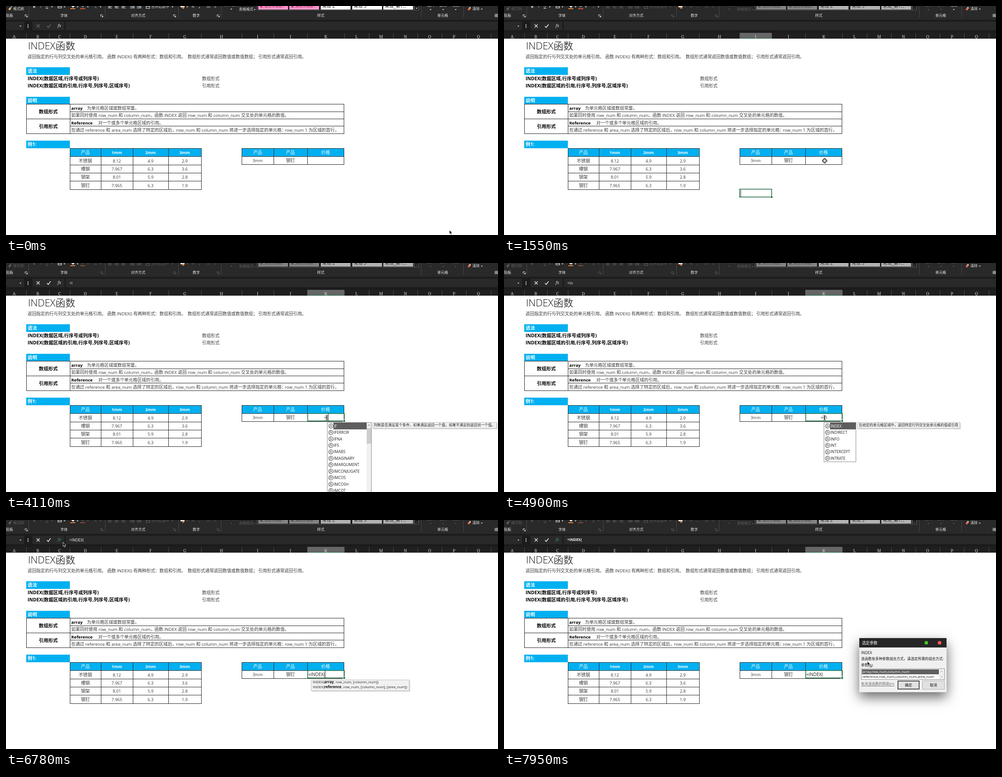
These frames come from a looping animation (1094x512 px, 8 s). An HTML page with a canvas:

```html
<!DOCTYPE html>
<html lang="zh-CN">
<head>
<meta charset="utf-8">
<title>INDEX函数</title>
<style>
html, body { margin: 0; width: 100%; height: 100%; overflow: hidden; background: #fff; }
canvas { display: block; }
</style>
</head>
<body>
<canvas id="stage" width="1094" height="512"></canvas>
<script>
const g = document.getElementById('stage').getContext('2d');
const LOOP = 8000;
const SANS = '"Open Sans", "Noto Sans CJK SC", "Noto Sans CJK", sans-serif';
const BLUE = '#00b0f0', GREEN = '#217346', DIM = '#5c5c5c', LIT = '#e6e6e6', RULE = '#222';

function box(x, y, w, h, color) {
  g.fillStyle = color;
  g.fillRect(x, y, w, h);
}

function frame(x, y, w, h, color) {
  g.strokeStyle = color;
  g.lineWidth = 1;
  g.strokeRect(x + .5, y + .5, w - 1, h - 1);
}

// y is the vertical middle of the line; returns the right end
function text(s, x, y, size = 9.7, color = '#3a3a3a', weight = 400, align = 'left', font = SANS) {
  g.font = `${weight} ${size}px ${font}`;
  g.textAlign = align;
  g.fillStyle = color;
  g.fillText(s, x, y + size * .37);
  return x + g.measureText(s).width;
}
const mid = (s, x, y, size, color, weight) => text(s, x, y, size, color, weight, 'center');

function path(points, color, width = 1, fill) {
  g.beginPath();
  points.forEach(([x, y], i) => i ? g.lineTo(x, y) : g.moveTo(x, y));
  if (fill) { g.closePath(); g.fillStyle = fill; g.fill(); }
  if (color) { g.strokeStyle = color; g.lineWidth = width; g.stroke(); }
}

function disc(x, y, r, fill, stroke) {
  g.beginPath();
  g.arc(x, y, r, 0, 7);
  if (fill) { g.fillStyle = fill; g.fill(); }
  if (stroke) { g.strokeStyle = stroke; g.lineWidth = 1; g.stroke(); }
}

const drop = (x, y, color) => path([[x - 2, y - 1], [x + 2, y - 1], [x, y + 1.4]], null, 0, color);

function chevron(x, y, dir, color) {
  path([[x - 2.5, y + dir], [x, y - dir * 1.5], [x + 2.5, y + dir]], color);
}

function launcher(x, y, color) {
  path([[x - 2.5, y + 1.5], [x - 2.5, y - 2.5], [x + 1.5, y - 2.5]], color);
  path([[x - .5, y - .5], [x + 2.5, y + 2.5], [x + 2.5, y - .5]], color);
  path([[x - .5, y + 2.5], [x + 2.5, y + 2.5]], color);
}

function grid(xs, ys) {
  const [l, r, t, b] = [xs[0], xs.at(-1), ys[0], ys.at(-1)];
  xs.forEach(x => box(x, t, 1, b - t + 1, RULE));
  ys.forEach(y => box(l, y, r - l + 1, 1, RULE));
}

// mode: 0 ready, 1 editing an empty cell, 2 typing a formula
function drawRibbon(mode) {
  box(0, 0, 1094, 31, '#292929');
  const a = mode ? DIM : LIT, b = mode > 1 ? DIM : LIT;

  path([[5, 7], [9, 3], [12, 6], [8, 10]], null, 0, mode ? DIM : '#d8b070');
  path([[10, 4], [13, 1]], a, 1.5);
  text('格式刷', 16, 6, 8, a);

  text('B', 60, 1.5, 8, b, 700);
  text('I', 76, 1.5, 8, b, 'italic 400');
  text('U', 88, 1, 8, b);
  box(88, 5, 6, 1, b);
  frame(115, -3, 9, 8, LIT);
  box(115, 1, 9, 1, LIT);
  path([[145, 0], [149, -3], [153, 0], [149, 4]], null, 0, LIT);
  box(143, 5, 11, 2, '#e8833a');
  text('A', 168, 0, 8, b);
  box(165, 5, 11, 2, mode > 1 ? '#8c4a35' : '#e8552f');
  [102, 182].forEach(x => drop(x, 2, b));
  [130, 159].forEach(x => drop(x, 2, LIT));
  text('文', 195, 1, 8, mode ? DIM : '#4c8fd0');
  drop(210, 2, b);

  [231, 246, 261].forEach(x => {
    for (let i = 0; i < 3; i++) box(x - 4, i * 2, i % 2 ? 6 : 9, 1, a);
  });
  [281, 296].forEach(x => {
    box(x - 5, 0, 10, 1, a);
    box(x - 1, 2, 6, 1, a);
    box(x - 5, 4, 10, 1, a);
    box(x - 5, 2, 3, 1, mode ? DIM : '#4c8fd0');
  });
  frame(311, -3, 9, 9, a);
  box(311, 1, 9, 1, a);
  text('合并后居中', 323, 1, 8, a);
  drop(370, 2, a);

  box(388, -1, 9, 4, LIT);
  disc(394, 4, 2.3, '#e8833a');
  drop(403, 2, a);
  text('%', 412, 1.5, 8, a);
  text(',', 429, 0, 10, a, 700);
  text('.00', 445, 2, 6.5, a);
  text('.0', 462, 2, 6.5, a);

  text('条件格式', 484, -3, 8, a);
  drop(501, 7, a);
  text('表格格式', 518, 7, 8, a);
  drop(553, 8, a);

  box(558, 0, 360, 11, '#1d1d1d');
  frame(558, -2, 349, 12, '#686868');
  const tiles = ['差_综合示例表…', '差_综合示例表…', '常规 2', '常规 3', '常规_第1…'];
  tiles.forEach((s, i) => {
    const x = 561 + i * 69.7 | 0, pink = i < 2;
    box(x, 0, 66, 8, mode ? (pink ? '#858585' : '#b2b2b2') : pink ? '#ff99cc' : '#fff');
    g.save();
    g.beginPath();
    g.rect(x, 0, 66, 7);
    g.clip();
    text(s, x + 3, 0, pink ? 7.8 : 10, mode ? '#333' : pink ? '#900050' : '#222');
    g.restore();
  });
  frame(908, -2, 10, 12, '#686868');
  drop(913, 5, a);

  ['插入', '删除', '格式'].forEach((s, i) => {
    const c = i === 2 ? b : a;
    text(s, 936 + i * 28, -2, 8, c);
    drop(944 + i * 28, 8, c);
  });
  path([[1026, 8], [1030, 3], [1034, 5], [1030, 10]], null, 0, '#e86b4a');
  path([[1029, 4], [1032, 2], [1034, 5]], null, 0, '#eee');
  text('清除', 1037, 6, 8, LIT);
  drop(1058, 7, LIT);

  const groups = [['贴板', 8], ['字体', 129], ['对齐方式', 294], ['数字', 423], ['样式', 700], ['单元格', 971], ['编辑', 1094]];
  groups.forEach(([s, x]) => mid(s, x, 21, 8, '#eee'));
  launcher(45, 22, LIT);
  launcher(213, 22, b);
  launcher(375, 22, a);
  launcher(472, 22, a);
  [50, 220, 383, 478, 923, 1017].forEach(x => box(x, 0, 1, 26, '#484848'));
}

function drawFormulaBar(mode, formula, hover, bold) {
  box(0, 31, 1094, 29, '#1c1c1c');
  [[0, 40], [59, 71], [133, 961]].forEach(([x, w]) => box(x, 35, w, 19, '#292929'));
  drop(32, 45, LIT);
  for (let i = 0; i < 3; i++) box(48, 41 + i * 3, 2, 2, '#ccc');
  const c = mode ? '#f2f2f2' : '#6c6c6c';
  path([[68, 41], [75, 48]], c, 1.3);
  path([[75, 41], [68, 48]], c, 1.3);
  path([[91, 45], [94, 48], [99, 41]], c, 1.5);
  text('fx', 115, 44, 9, hover ? '#38a866' : '#eee', 'italic 400', 'left', '"Noto Serif", serif');
  text(formula, 141, 44.5, bold ? 8 : 8.5, '#f4f4f4', bold ? 700 : 400);
}

const EDGES = [0, 45, 96, 142, 211, 282, 361, 434, 524, 595, 670, 752, 807, 861, 915, 969, 1023, 1078];

function drawHeaders(active) {
  box(0, 60, 1094, 13, '#1f1f1f');
  EDGES.slice(0, -1).forEach((l, i) => {
    const r = EDGES[i + 1], letter = String.fromCharCode(65 + i);
    if (letter === active) {
      box(l, 60, r - l, 13, '#666');
      box(l, 72, r - l, 1, GREEN);
    }
    box(r, 61, 1, 12, '#505050');
    text(letter, i ? (l + r) / 2 : 18, 68, 9.5, '#d4d4d4', 400, 'center', '"Noto Serif", serif');
  });
}

function drawSheet() {
  box(0, 73, 1094, 439, '#fff');
  const end = text('INDEX', 49, 89, 22, '#111', 300);
  text('函数', end, 89, 22, '#444', 300);
  const pieces = [
    [48, 113, '返回指定的行与列交叉处的单元格引用。'],
    [225, 113, '函数 INDEX() 有两种形式：数组和引用。'],
    [404, 113, '数组形式通常返回数值或数值数组；'],
    [561, 113, '引用形式通常返回引用。'],
    [436, 162, '数组形式'],
    [436, 178, '引用形式'],
    [180, 228, '为单元格区域或数组常量。'],
    [145, 244, '如果同时使用 row_num 和 column_num，'],
    [330, 244, '函数 INDEX 返回 row_num 和 column_num 交叉处的单元格的数值。'],
    [205, 261, '对一个或多个单元格区域的引用。'],
    [145, 277, '在通过 reference 和 area_num 选择了特定的区域后，'],
    [378, 277, 'row_num 和 column_num 将进一步选择指定的单元格：'],
    [620, 277, 'row_num 1 为区域的首行，']
  ];
  pieces.forEach(([x, y, s]) => text(s, x, y));

  [['语法', 137], ['说明', 203], ['例1:', 301]].forEach(([s, y]) => {
    box(45, y, 97, 17, BLUE);
    text(s, 48, y + 8.5, 10.5, '#fff', 700);
  });
  text('INDEX(数据区域,行序号或列序号)', 48, 162, 10.5, '#000', 700);
  text('INDEX(数据区域的引用,行序号,列序号,区域序号)', 48, 178, 10.5, '#000', 700);
  mid('数组形式', 94, 236, 10.5, '#000', 700);
  mid('引用形式', 94, 269, 10.5, '#000', 700);
  text('array', 145, 228, 9.5, '#000', 700);
  text('Reference', 145, 261, 9.5, '#000', 700);
  grid([45, 142, 751], [219, 252, 285]);
  box(142, 236, 610, 1, RULE);
  box(142, 268, 610, 1, RULE);

  table([142, 211, 282, 361, 434], [318, 336, 355, 373, 391, 410], [
    ['产品', '1mm', '2mm', '3mm'],
    ['不锈钢', '8.12', '4.9', '2.9'],
    ['槽钢', '7.967', '6.3', '3.6'],
    ['钢架', '8.01', '5.9', '2.8'],
    ['钢钉', '7.965', '6.3', '1.9']
  ]);
  table([524, 595, 670, 751], [318, 336, 354], [['产品', '产品', '价格'], ['3mm', '钢钉', '']]);
}

function table(xs, ys, rows) {
  box(xs[0], ys[0], xs.at(-1) - xs[0], ys[1] - ys[0], BLUE);
  rows.forEach((row, r) => row.forEach((s, c) => {
    const latin = /\d/.test(s);
    mid(s, (xs[c] + xs[c + 1]) / 2, (ys[r] + ys[r + 1]) / 2 + .7, latin ? 9.2 : 9.8,
      r ? '#3a3a3a' : '#fff', !r && latin ? 700 : 400);
  }));
  grid(xs, ys);
}

const CELLS = { I: [523, 409, 73, 19], K: [670, 336, 83, 18] };

function drawSelection(col) {
  const [x, y, w, h] = CELLS[col];
  g.strokeStyle = GREEN;
  g.lineWidth = 1.6;
  g.strokeRect(x + .8, y + .5, w - 1.6, h - 1.4);
  box(x + w - 4, y + h - 4, 5, 5, '#fff');
  box(x + w - 3, y + h - 3, 4, 4, GREEN);
}

// Blinking caret: fades out, then back in
function drawCaret(x, y, age) {
  const p = age % 1060;
  g.globalAlpha = p < 470 ? 1 : p < 620 ? (620 - p) / 150 : p < 980 ? 0 : (p - 980) / 80;
  box(x, y, 1, 16, '#222');
  g.globalAlpha = 1;
}

function tip(x, y, w, h) {
  box(x + 2, y + 2, w, h, 'rgba(0,0,0,.13)');
  box(x, y, w, h, '#f1f1f1');
  frame(x, y, w, h, '#bdbdbd');
}

function drawList(x, w, h, names, scroll) {
  box(x, 356, w, h, '#fff');
  frame(x, 356, w, h, '#8a8a8a');
  const right = x + w - (scroll ? 11 : 1);
  box(x + 14, 357, right - x - 14, 15, '#5e5e5e');
  names.forEach((s, i) => {
    const y = 364.5 + i * 14.45;
    disc(x + 8.5, y, 5, '#fff', '#333');
    text('fx', x + 8.5, y - .3, 7, '#222', 'italic 500', 'center', '"Noto Serif", serif');
    text(s, x + 15, y, 8.5, i ? '#222' : '#fff');
  });
  if (scroll) {
    box(right, 357, 10, h - 2, '#f0f0f0');
    box(right, 369, 10, 35, '#cdcdcd');
    chevron(right + 5, 363, 1, '#555');
  }
}

function drawSuggestions(t) {
  if (t < 4350) {
    drawList(714, 99, 170, ['IF', 'IFERROR', 'IFNA', 'IFS', 'IMABS', 'IMAGINARY', 'IMARGUMENT',
      'IMCONJUGATE', 'IMCOS', 'IMCOSH', 'IMCOT'], true);
    tip(815, 356, 276, 14);
    text('判断是否满足某个条件，如果满足返回一个值，如果不满足则返回另一个值。', 818, 362.5, 7.95, '#222');
  } else {
    drawList(711, 72, 89, ['INDEX', 'INDIRECT', 'INFO', 'INT', 'INTERCEPT', 'INTRATE']);
    tip(785, 356, 229, 14);
    text('在给定的单元格区域中，返回特定行列交叉处单元格的值或引用', 789, 362.5, 7.9, '#222');
  }
}

function drawSyntax() {
  tip(678, 357, 219, 25);
  [['array', ', row_num, [column_num])', 362.5], ['reference', ', row_num, [column_num], [area_num])', 373.5]]
    .forEach(([name, rest, y]) => {
      let x = text('INDEX(', 682, y, 8, '#222');
      x = text(name, x, y, 8, '#111', 700);
      text(rest, x, y, 8, '#222');
    });
}

function drawDialog() {
  g.save();
  g.shadowColor = 'rgba(0,0,0,.6)';
  g.shadowBlur = 26;
  g.shadowOffsetY = 11;
  box(790, 265, 194, 120, '#f0f0f0');
  g.restore();
  box(790, 264, 194, 21, '#262626');
  text('选定参数', 796, 274.5, 8.6, '#fff');
  disc(939, 274.5, 4, '#45c322');
  disc(968.5, 274.5, 4, '#ff5a52');
  const ink = '#111';
  text('INDEX', 794, 296.5, 8.4, ink);
  text('该函数有多种参数组合方式，请选定所需的组合方式:', 794, 310.5, 7.9, ink);
  text('参数(A):', 794, 324.5, 7.9, ink);
  box(813, 328, 5, 1, ink);

  box(794, 332, 186, 25, '#fff');
  frame(794, 332, 186, 25, '#8a919c');
  box(796, 334, 171, 11, '#606060');
  text('array,row_num,column_num', 797, 339.5, 7.85, '#fff');
  text('reference,row_num,column_num,area_num', 797, 350.5, 7.85, ink);
  box(967, 333, 12, 23, '#f0f0f0');
  chevron(973, 339, 1, '#999');
  chevron(973, 350, -1, '#999');

  const end = text('有关该函数的帮助(H)', 794, 366.5, 7.9, '#666');
  box(794, 371, end - 794, 1, '#777');
  box(875, 359, 49, 20, '#e1e1e1');
  g.strokeStyle = '#505050';
  g.lineWidth = 2;
  g.strokeRect(876, 360, 47, 18);
  box(930, 359, 50, 20, '#e1e1e1');
  frame(930, 359, 50, 20, '#b0b0b0');
  mid('确定', 899.5, 369.5, 8, ink);
  mid('取消', 955, 369.5, 8, ink);
}

// [first change, last change, steps, x, y]
const MOVES = [
  [70, 830, 11, 559, 418],
  [1000, 1150, 3, 713, 346],
  [5770, 6550, 11, 142, 54],
  [6620, 6780, 3, 127, 50],
  [7090, 7400, 5, 327, 127],
  [7480, 7950, 7, 808, 316]
];

function pointerAt(t) {
  let x = 986, y = 501;
  for (const [from, to, n, tx, ty] of MOVES) {
    if (t < from) break;
    const k = Math.min(n, Math.floor((t - from) / (to - from) * (n - 1) + 1.001));
    const p = k / n, e = p * p * (3 - 2 * p);
    x += (tx - x) * e;
    y += (ty - y) * e;
  }
  return [x, y];
}

function drawPointer(t) {
  const [x, y] = pointerAt(t);
  const inCell = (t >= 920 && t < 1000) || (t >= 2320 && t < 5770);
  if (inCell) {
    const h = 5;
    path([[x, y - h], [x, y + h]], '#111', 1.2);
    [-h, h].forEach(d => path([[x - 2.5, y + d], [x - 1, y + d], [x, y + d * .85], [x + 1, y + d], [x + 2.5, y + d]], '#111'));
  } else if (t < 70 || y < 73 || t >= 6620) {
    const shape = [[0, 0], [0, 9], [2, 7.2], [3.3, 10.4], [5, 9.7], [3.7, 6.6], [6.2, 6.3]];
    path(shape.map(([a, b]) => [x + a, y + b]), '#fff', .8, '#000');
  } else {
    const a = 1.6, b = 4.8;
    const shape = [[-a, -b], [a, -b], [a, -a], [b, -a], [b, a], [a, a], [a, b], [-a, b], [-a, a], [-b, a], [-b, -a], [-a, -a], [-a, -b]];
    path(shape.map(([u, v]) => [x + u, y + v]), '#000', 1.2, '#fff');
  }
}

// [start, formula, text centre, caret x]
const TYPING = [
  [2410, '', 711, 711],
  [3640, '=', 711, 714],
  [4110, '=i', 711.5, 716],
  [4280, '=in', 711.5, 718],
  [5450, '=INDEX(', 690.5, 709]
];

function draw(t) {
  const mode = t >= 3640 ? 2 : t >= 2320 || (t >= 1000 && t < 1840) ? 1 : 0;
  const checks = (t >= 1000 && t < 1620) || t >= 2320;
  const col = t >= 1620 ? 'K' : t >= 830 ? 'I' : null;
  const entry = TYPING.findLast(e => t >= e[0]);
  const dialog = t >= 7090;

  drawRibbon(mode);
  drawFormulaBar(checks, entry ? entry[1] : '', t >= 6620, dialog);
  drawSheet();
  drawHeaders(col);
  if (col) drawSelection(col);
  if (t >= 1000 && t < 1620) drawCaret(526, 411, Math.max(0, t - 1080));
  if (entry) {
    const [start, formula, cx, caret] = entry;
    mid(formula, cx, 345.5, 9.9, '#222');
    if (!dialog) drawCaret(caret, 337, t - start);
  }
  if (t >= 4110 && t < 5450) drawSuggestions(t);
  if (t >= 5450 && !dialog) drawSyntax();
  if (dialog) drawDialog();
  drawPointer(t);
}

const origin = performance.now();
function tick() {
  draw((performance.now() - origin) % LOOP);
  requestAnimationFrame(tick);
}
tick();
</script>
</body>
</html>
```
